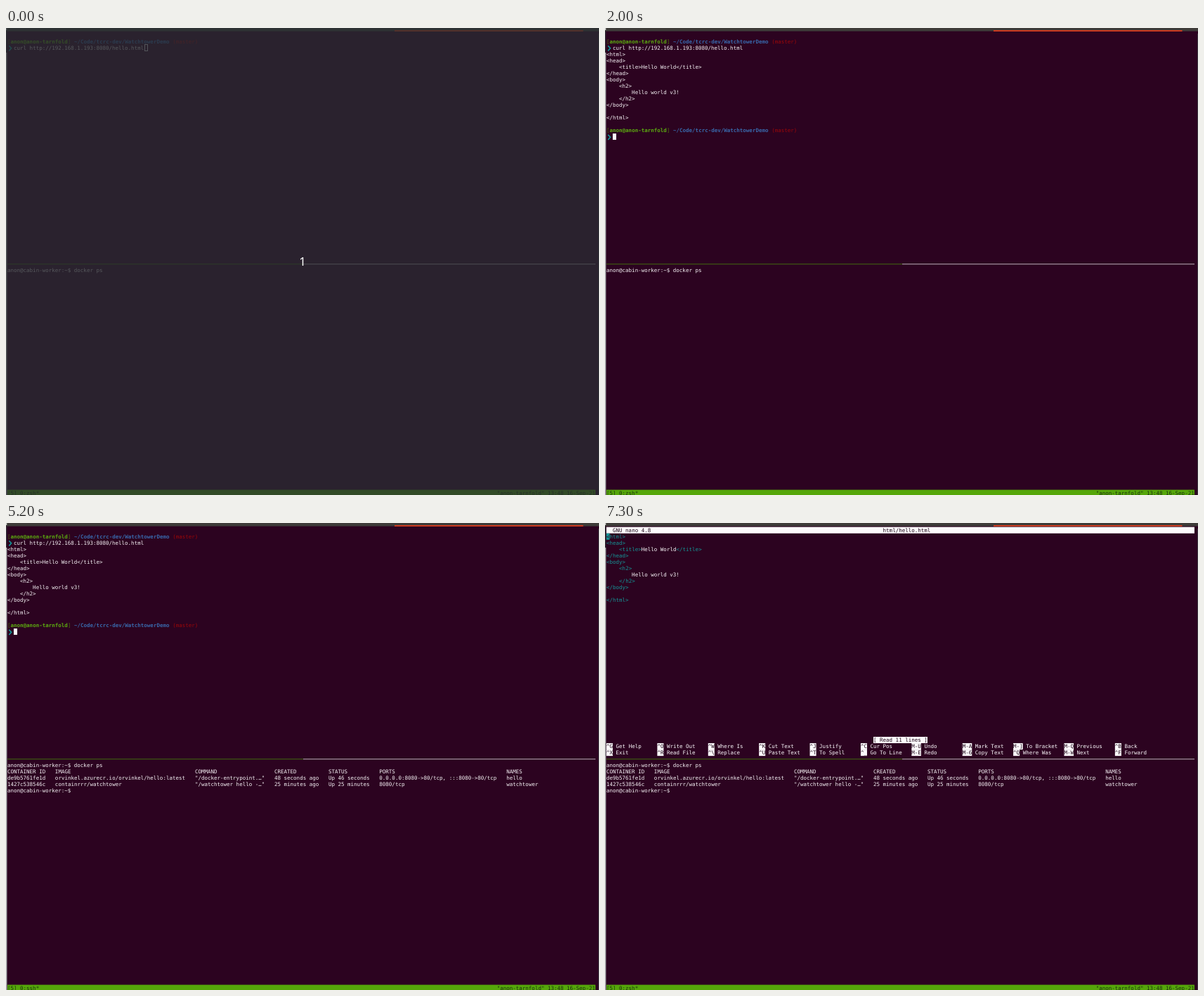
An HTML page with a canvas for the animation above (8 s loop, 844 px wide and 664 px high).

```html
<!DOCTYPE html>
<html lang="en">
<head>
<meta charset="utf-8">
<title>Terminal session</title>
<style>
html, body { margin: 0; width: 100%; height: 100%; overflow: hidden; background: #2c0320; }
canvas { display: block; }
</style>
</head>
<body>
<canvas id="stage" width="844" height="664"></canvas>
<script>
const ctx = document.getElementById('stage').getContext('2d');
const LOOP = 8000;
const CELL = 4.524, ROW = 9.04, LEFT = 2, TOP = 5.7, BASE = 7.1, COLS = 185;
const SIZE = CELL / 0.60205;
const TEAL = '#159496', GREEN = '#55a60a', PAPER = '#fcfafc';

const ACCOUNT = 'anon', MACHINE = 'anon-tarnfold', REMOTE = 'anon@cabin-worker:~$ ';
const URL_CMD = 'curl http://192.168.1.193:8080/hello.html';
const PAGE = [
  '<html>', '<head>', '    <title>Hello World</title>', '</head>', '<body>',
  '    <h2>', '        Hello world v3!', '    </h2>', '</body>', '', '</html>'
];
const TABLE_COLS = [0, 15, 59, 84, 101, 117, 157];
const TABLE = [
  ['CONTAINER ID', 'IMAGE', 'COMMAND', 'CREATED', 'STATUS', 'PORTS', 'NAMES'],
  ['de9b5761fe1d', 'orvinkel.azurecr.io/orvinkel/hello:latest', '"/docker-entrypoint.…"',
    '48 seconds ago', 'Up 46 seconds', '0.0.0.0:8080->80/tcp, :::8080->80/tcp', 'hello'],
  ['1427c538546c', 'containrrr/watchtower', '"/watchtower hello -…"',
    '25 minutes ago', 'Up 25 minutes', '8080/tcp', 'watchtower']
];
const KEYS = [
  ['^G Get Help', '^O Write Out', '^W Where Is', '^K Cut Text', '^J Justify', '^C Cur Pos',
    'M-U Undo', 'M-A Mark Text', 'M-] To Bracket', 'M-Q Previous', '^B Back'],
  ['^X Exit', '^R Read File', '^\\ Replace', '^U Paste Text', '^T To Spell', '^_ Go To Line',
    'M-E Redo', 'M-6 Copy Text', '^Q Where Was', 'M-W Next', '^F Forward']
];
const TYPED = [
  [5600, 'n'], [5800, 'na'], [6000, 'nan'], [6100, 'nano'], [6200, 'nano '], [6300, 'nano h'],
  [6400, 'nano ht'], [6500, 'nano html/'], [6800, 'nano html/hello.html ']
];

const colX = c => LEFT + c * CELL;
const rowY = r => TOP + r * ROW;
const within = (t, a, b) => t >= a && t < b;

function box(x, y, w, h, color) {
  ctx.fillStyle = color;
  ctx.fillRect(x, y, w, h);
}

function cells(col, row, count, color) {
  box(colX(col), rowY(row), count * CELL, ROW, color);
}

function text(str, col, row, color, bold) {
  ctx.font = `${bold ? 'bold ' : ''}${SIZE}px "DejaVu Sans Mono", monospace`;
  ctx.fillStyle = color;
  ctx.fillText(str, colX(col), rowY(row) + BASE);
}

function inverse(str, col, row) {
  cells(col, row, str.length, PAPER);
  text(str, col, row, '#1c0416');
}

function cursor(col, row) {
  box(Math.round(colX(col)), Math.round(rowY(row)), 5, 9, PAPER);
}

function hollowCursor(col, row) {
  ctx.strokeStyle = '#d8d0d6';
  ctx.lineWidth = 1;
  ctx.strokeRect(Math.round(colX(col)) + 0.5, Math.floor(rowY(row)) + 0.5, 4, 9);
}

function prompt(row, command, ink) {
  const parts = [
    ['[', '#4f6b0d'], [`${ACCOUNT}@${MACHINE}`, '#5cab10', true], ['] ', '#4f6b0d'],
    ['~/Code/tcrc-dev/WatchtowerDemo', '#3968aa', true], [' (master)', '#9d0709']
  ];
  let col = 0;
  for (const [str, color, bold] of parts) {
    text(str, col, row, color, bold);
    col += str.length;
  }
  const y = rowY(row + 1);
  ctx.strokeStyle = '#0da0a2';
  ctx.lineWidth = 1.5;
  ctx.beginPath();
  ctx.moveTo(4.3, y + 1.4);
  ctx.lineTo(7.6, y + 5);
  ctx.lineTo(4.3, y + 8.6);
  ctx.stroke();
  text(command, 2, row + 1, ink);
}

function shell(t, ink) {
  prompt(1, URL_CMD, ink);
  if (t < 500) hollowCursor(43, 2);
  else if (t < 1100 || within(t, 1700, 2000)) cursor(43, 2);
  if (t < 2000) return;

  PAGE.forEach((line, i) => text(line, 0, 3 + i, ink));
  let typed = '';
  for (const [at, str] of TYPED) if (t >= at) typed = str;
  prompt(15, typed, ink);
  if (t < 2500 || within(t, 2700, 3300) || t >= 5200) cursor(2 + typed.length, 16);
}

function nano() {
  cells(0, 0, COLS, PAPER);
  text('GNU nano 4.8', 2, 0, '#1c0416');
  text('html/hello.html', 87, 0, '#1c0416');
  PAGE.forEach((line, i) => {
    let col = 0;
    for (const part of line.split(/(<[^>]+>)/)) {
      text(part, col, 1 + i, part[0] === '<' ? TEAL : PAPER);
      col += part.length;
    }
  });
  cells(0, 1, 1, TEAL);
  text('<', 0, 1, '#2c0320');
  inverse('[ Read 11 lines ]', 84, 33);
  KEYS.forEach((list, r) => list.forEach((item, i) => {
    const gap = item.indexOf(' ');
    inverse(item.slice(0, gap), i * 16, 34 + r);
    text(item.slice(gap + 1), i * 16 + gap + 1, 34 + r, PAPER);
  }));
}

function remote(t, ink) {
  text(REMOTE + 'docker ps', 0, 37, ink);
  if (within(t, 3300, 3700)) cursor(30, 37);
  if (within(t, 4100, 4200)) cursor(0, 38);
  if (t < 4200) return;
  TABLE.forEach((line, r) => line.forEach((str, i) => text(str, TABLE_COLS[i], 38 + r, ink)));
  text(REMOTE, 0, 41, ink);
  if (t < 5200) cursor(21, 41);
}

function chrome(t, focused) {
  box(0, 0, 844, 4.6, focused ? '#3e3c39' : '#434540');
  box(553, 3, 268.5, 2, focused ? '#cb3b20' : '#d5401c');
  box(0, 0, 1.3, 3, '#d4d6d4');
  box(0, 5, 1.3, 30, '#34333a');
  box(0, 35, 1.4, 629, focused ? '#b4bab8' : '#d8dad8');
  box(843, 8, 1, 656, '#3b3740');

  const lower = within(t, 3300, 5200);
  const dim = '#40680f', lit = '#b9aeb6';
  box(LEFT, 335.2, 421, 1, lower ? lit : dim);
  box(423, 335.2, 416, 1, lower ? dim : lit);

  cells(0, 72, COLS, GREEN);
  text(`[5] 0:${within(t, 3300, 5500) ? 'ssh' : 'zsh'}*`, 0, 72, '#1c3410');
  text(`"${MACHINE}" 13:48 16-Sep-21`, 154, 72, '#1c3410');
}

function countdown() {
  box(0, 0, 844, 664, 'rgba(39, 44, 49, 0.75)');
  ctx.font = '16.8px "Noto Sans", sans-serif';
  ctx.textAlign = 'center';
  ctx.fillStyle = '#fff';
  ctx.fillText('1', 422, 338);
  ctx.textAlign = 'left';
}

function draw(t) {
  const focused = t >= 500;
  const ink = focused ? '#f6f3f5' : '#dfd8dd';
  ctx.textRendering = 'geometricPrecision';
  box(0, 0, 844, 664, focused ? '#2c0320' : '#330326');
  chrome(t, focused);
  if (t < 7300) shell(t, ink);
  else nano();
  remote(t, ink);
  if (t < 100) countdown();
}

const start = performance.now();
function tick() {
  draw((performance.now() - start) % LOOP);
  requestAnimationFrame(tick);
}
tick();
</script>
</body>
</html>
```
